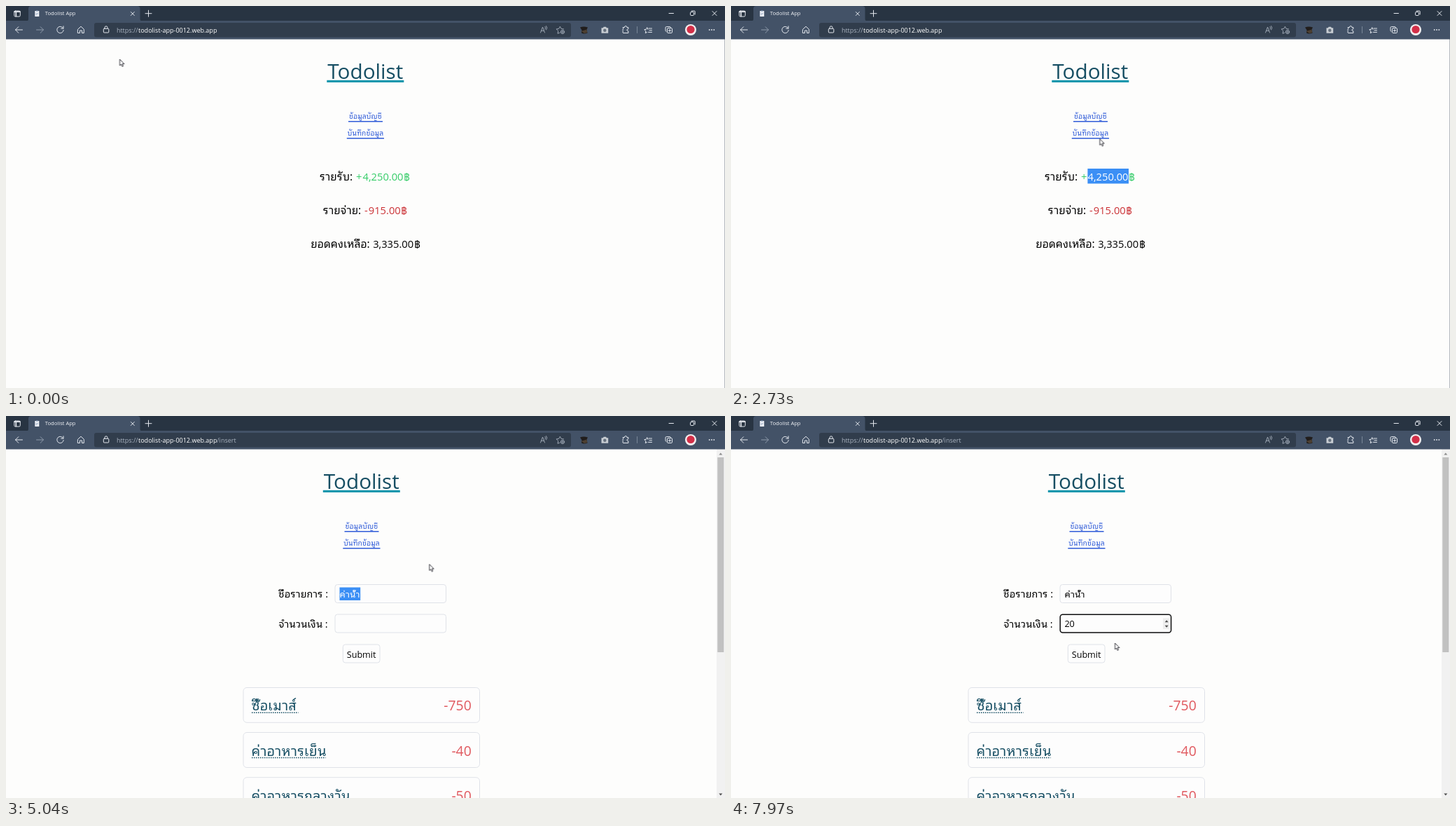
Animation of 1027 by 545 pixels, one loop 8000 ms. Source, as an HTML page:

```html
<!DOCTYPE html>
<html lang="th">
<head>
<meta charset="utf-8">
<title>Todolist App</title>
<style>
html, body { margin: 0; width: 100%; height: 100%; overflow: hidden; background: #fdfdfc; }
svg { display: block; width: 100vw; height: 100vh; }
text { font-family: "Open Sans", "Noto Sans Thai Looped", "Noto Looped Thai", "Noto Sans Thai", Loma, "Noto Sans", sans-serif; white-space: pre; }
.mid { text-anchor: middle; }
.end { text-anchor: end; }
.title { font-size: 29.7px; fill: #164e63; text-anchor: middle; }
.link { font-size: 10.4px; fill: #2f5bd8; text-anchor: middle; }
.sum { font-size: 15.6px; text-anchor: middle; }
.num { font-size: 14.7px; }
.label { font-size: 14.6px; text-anchor: middle; }
.value { font-size: 13px; }
.item { font-size: 19.8px; fill: #164e63; }
.cost { font-size: 19.4px; fill: #e0595f; text-anchor: end; }
.box { fill: #fdfdfd; stroke: #dfe2e8; }
.icon { fill: none; stroke: #e4e8ee; stroke-width: 1; stroke-linecap: round; stroke-linejoin: round; }
.dim { stroke: #8f9bab; }

/* hard switches */
.sw { animation: 8s step-end infinite; }
.home { animation-name: home; }
.insert { animation-name: insert; }
.pickSum { animation-name: pickSum; }
.typed { animation-name: typed; }
.pickName { animation-name: pickName; }
.spin { animation-name: spin; }
.focus { animation-name: focus; }
.two { animation-name: two; }
.zero { animation-name: zero; }
.arrow { animation-name: arrow; }
.beam { animation-name: beam; }
.hand { animation-name: hand; }
@keyframes home { 0% { opacity: 1 } 37.1% { opacity: 0 } }
@keyframes insert { 0% { opacity: 0 } 37.1% { opacity: 1 } }
@keyframes pickSum { 0% { opacity: 0 } 21.9% { opacity: 1 } 37.1% { opacity: 0 } }
@keyframes typed {
  0% { clip-path: inset(-5px 100% -5px 0) }
  47.6% { clip-path: inset(-5px 73% -5px 0) }
  48.6% { clip-path: inset(-5px 51% -5px 0) }
  49.6% { clip-path: inset(-5px 22% -5px 0) }
  50.7% { clip-path: inset(-5px) }
}
@keyframes pickName { 0% { opacity: 0 } 58% { opacity: 1 } 65.2% { opacity: 0 } }
@keyframes spin { 0% { opacity: 0 } 70.4% { opacity: 1 } }
@keyframes focus { 0% { opacity: 0 } 75% { opacity: 1 } }
@keyframes two { 0% { opacity: 0 } 81.25% { opacity: 1 } }
@keyframes zero { 0% { opacity: 0 } 84.6% { opacity: 1 } }
@keyframes arrow {
  0% { opacity: 1 } 19.4% { opacity: 0 } 25.6% { opacity: 1 } 34.9% { opacity: 0 }
  40.8% { opacity: 1 } 42.5% { opacity: 0 } 60.4% { opacity: 1 } 70.3% { opacity: 0 } 96% { opacity: 1 }
}
@keyframes beam {
  0% { opacity: 0 } 19.4% { opacity: 1 } 25.6% { opacity: 0 } 42.5% { opacity: 1 }
  60.4% { opacity: 0 } 70.3% { opacity: 1 } 96% { opacity: 0 }
}
@keyframes hand { 0% { opacity: 0 } 34.9% { opacity: 1 } 40.8% { opacity: 0 } }

.pointer { animation: move 8s ease-in-out infinite; }
@keyframes move {
  0%, .375% { transform: translate(162.5px, 76px) }
  5.4%, 7.9% { transform: translate(690px, 182px) }
  8.25%, 10.4% { transform: translate(689px, 184px) }
  12.5%, 14.1% { transform: translate(684px, 195.5px) }
  20.4%, 23.5% { transform: translate(545px, 244px) }
  30.4%, 32.9% { transform: translate(534px, 196px) }
  34.1%, 34.6% { transform: translate(526.7px, 189.5px) }
  35.4%, 39.6% { transform: translate(524px, 182px) }
  44.1%, 53.75% { transform: translate(530.7px, 253px) }
  56%, 58.2% { transform: translate(495px, 254px) }
  63%, 64.6% { transform: translate(604.7px, 211.5px) }
  71.75%, 86.75% { transform: translate(576.7px, 300.5px) }
  89.6%, 93.75% { transform: translate(572px, 303px) }
  99.6%, 100% { transform: translate(548.5px, 324px) }
}
</style>
</head>
<body>
<svg viewBox="0 0 1027 545" preserveAspectRatio="none">
  <defs>
    <g id="head">
      <text class="title" x="513.2" y="103.6">Todolist</text>
      <rect x="458.3" y="105.8" width="110" height="3.2" fill="#1797ad"/>
      <text class="link" x="513.3" y="161">ข้อมูลบัญชี</text>
      <rect x="489" y="164" width="49" height="1.5" fill="#2f5bd8"/>
      <text class="link" x="513.3" y="185.3">บันทึกข้อมูล</text>
      <rect x="486.8" y="188" width="53.2" height="1.5" fill="#2f5bd8"/>
    </g>
  </defs>
  <rect width="1027" height="545" fill="#fdfdfc"/>

  <!-- summary page -->
  <g class="sw home">
    <use href="#head"/>
    <text class="sum" x="471.5" y="249">รายรับ:</text>
    <g class="num" fill="#35cc68">
      <text x="500" y="249">+</text><text x="509.6" y="249">4,250.00</text><text x="568.2" y="249">฿</text>
    </g>
    <text class="sum" x="480" y="297">รายจ่าย:</text>
    <g class="num" fill="#cb3236">
      <text x="512" y="297">-</text><text x="517.8" y="297">915.00</text><text x="564.3" y="297">฿</text>
    </g>
    <text class="sum" x="477.5" y="345">ยอดคงเหลือ:</text>
    <g class="num"><text x="524.2" y="345">3,335.00</text><text x="583.2" y="345">฿</text></g>
    <g class="sw pickSum">
      <rect x="509.4" y="232" width="58.6" height="21.4" fill="#3b8ff5"/>
      <text class="num" x="509.6" y="249" fill="#fff">4,250.00</text>
    </g>
    <rect x="1026" y="47" width="1" height="498" fill="#b4b8be"/>
  </g>

  <!-- entry page -->
  <g class="sw insert">
    <use href="#head" x="-5.5"/>
    <text class="label" x="424.5" y="259">ชื่อรายการ :</text>
    <text class="label" x="424.5" y="301.5">จำนวนเงิน :</text>
    <rect class="box" x="470" y="240.5" width="158.5" height="26" rx="3.5"/>
    <rect class="box" x="470" y="283" width="158.5" height="26" rx="3.5"/>
    <g class="sw typed"><text class="value" x="476.5" y="258.8">ค่าน้ำ</text></g>
    <g class="sw pickName">
      <rect x="476.5" y="244.5" width="29.7" height="18.5" fill="#3b8ff5"/>
      <text class="value" x="476.5" y="258.8" fill="#fff">ค่าน้ำ</text>
    </g>
    <g class="sw spin">
      <rect x="617" y="288.5" width="10.5" height="15.5" fill="#eeeeee"/>
      <path d="M619.7 294.2l2.5-3 2.5 3zM619.7 298.7l2.5 3 2.5-3z" fill="#4c4c4c"/>
    </g>
    <rect class="sw focus" x="470.2" y="283.2" width="158.4" height="25.8" rx="3.5" fill="none" stroke="#101010" stroke-width="1.5"/>
    <text class="value sw two" x="476.4" y="301.4" style="font-size:12.6px">2</text>
    <text class="value sw zero" x="483.6" y="301.4" style="font-size:12.6px">0</text>
    <rect class="box" x="481.3" y="326" width="52.7" height="26" rx="3.5"/>
    <text class="mid" x="507.6" y="344.7" font-size="12.6">Submit</text>

    <rect class="box" x="339" y="387.5" width="337.5" height="49.8" rx="5"/>
    <rect class="box" x="339" y="451.5" width="337.5" height="50" rx="5"/>
    <rect class="box" x="339" y="515.7" width="337.5" height="50" rx="5"/>
    <text class="item" x="350.5" y="420.2">ซื้อเมาส์</text>
    <text class="item" x="350.5" y="484.6">ค่าอาหารเย็น</text>
    <text class="item" x="350.5" y="548.8">ค่าอาหารกลางวัน</text>
    <path d="M351 423.3H417.5M351 487.6H456.5" stroke="#164e63" stroke-width="1.5" stroke-dasharray="1.5 1.5"/>
    <text class="cost" x="664.8" y="420.2">-750</text>
    <text class="cost" x="664.8" y="484.6">-40</text>
    <text class="cost" x="664.8" y="548.8">-50</text>

    <rect x="1015" y="47" width="12" height="498" fill="#f1f1f1"/>
    <rect x="1016.3" y="59" width="9" height="278" fill="#c1c1c1"/>
    <path d="M1018.3 55.5l2.5-3 2.5 3z" fill="#8a8a8a"/>
    <path d="M1018.3 538.5l2.5 3 2.5-3z" fill="#505050"/>
  </g>

  <!-- browser frame -->
  <rect width="1027" height="22" fill="#283442"/>
  <rect y="21" width="1027" height="26.5" fill="#435267"/>
  <path d="M29 21.5q3 0 3-3V4q0-4 4-4H187.500q4 0 4 4V18.500q0 3 3 3z" fill="#435267"/>
  <rect x="126" y="24" width="681" height="20.500" rx="3" fill="#313d4c"/>
  <text x="55.8" y="13.300" font-size="7.600" fill="#f2f4f7">Todolist App</text>
  <text class="end" x="188.600" y="37.500" font-size="9" fill="#a9b3c0">https://</text>
  <text x="189" y="37.500" font-size="9" fill="#fff">todolist-app-0012.web.app<tspan class="sw insert" fill="#a9b3c0" id="path"></tspan></text>
  <g class="sw insert"><text x="301.300" y="37.500" font-size="9" fill="#a9b3c0">/insert</text></g>

  <g class="icon">
    <rect x="11.800" y="7" width="8.500" height="8" rx="1.500"/><path d="M12 8.200H20M14.300 9V14.500" stroke-width="1.700"/>
    <path d="M178.300 8.500l5 5m0-5l-5 5M203.500 6.200v9m-4.500-4.500h9"/>
    <path d="M947 10.500h6.500M1009 7.500l6 6m0-6l-6 6"/>
    <rect x="977.500" y="8.500" width="5" height="5" rx="1"/><path d="M979.200 7h4q1 0 1 1v4"/>
    <path d="M23.500 34h-10m4.300-4.300L13.500 34l4.300 4.300"/>
    <path class="dim" d="M43.500 34h10m-4.300-4.300l4.300 4.300-4.300 4.300"/>
    <path d="M81.800 32a4.700 4.700 0 1 0 .400 2.500M82 28.800v3.300h-3.300"/>
    <path d="M102.700 33.200l4.300-4 4.300 4v5.300h-2.800v-3.500h-3v3.500h-2.800z"/>
    <rect x="139.300" y="32.300" width="7.500" height="5.700" rx="1"/><path d="M141 32v-1.200a2 2 0 0 1 4 0V32"/>
    <g stroke="#a7b1be" stroke-width=".9">
      <path d="M763.500 38l3-8 3 8m-5-2.700h4M770 29.500q1.500 1.500 0 3.500m1.700-4.500q2.300 2.500 0 5.500"/>
      <path d="M791 38l-3 1.300.700-3.800-2.600-2.600 3.600-.500 1.700-3.200 1.700 3.200 3.400.500"/>
      <circle cx="795" cy="37" r="2.600"/><path d="M795 35.700v2.600m-1.300-1.300h2.600"/>
    </g>
    <path d="M881.500 30.500h2q0-2 1.700-2t1.700 2h2v2.300q-2 0-2 1.500t2 1.500v2.700h-7.400q-1.500-1.500 0-3-2-1.200 0-2.500z"/>
    <path d="M901.500 29.500v9" stroke="#7a8798"/>
    <path d="M915.500 37.500l-2.200 1.200.500-3-2-2 2.700-.400 1.200-2.700 1.200 2.700M918 32h4.500m-3.500 2.700h3.500m-5 2.700h5"/>
    <rect x="944.500" y="31.500" width="7" height="7" rx="1.300"/><path d="M943 36.500q-1-.500-1-1.500v-4q0-1.500 1.500-1.500h4.500q1 0 1.500 1M948 33.300v3.400m-1.700-1.700h3.400"/>
  </g>
  <path d="M41.300 7h6v8h-6z" fill="#f0f3f8"/><path d="M43 6.300h2.600v1.500H43zM42.500 10h3.500v.800h-3.500zM42.500 12h2.500v.800h-2.500z" fill="#8499b5"/>
  <path d="M820 30.500q5-2 11 0l-1.500 3 1 5q-5 2-8.500 0l.500-4z" fill="#211d1b"/><path d="M821.500 36l8-2.500.700 4.500-4 1z" fill="#4d4032"/>
  <path d="M850.500 31.200h2.200l1-1.500h3.300l1 1.500h2.200v7.500h-9.700z" fill="#c8cdd3"/><circle cx="855.300" cy="34.800" r="2.200" fill="#66717f"/>
  <circle cx="978" cy="34" r="8" fill="#f3eff0"/><circle cx="978" cy="33.500" r="5.600" fill="#d32f48"/>
  <g fill="#e4e8ee"><circle cx="1004.700" cy="34" r=".9"/><circle cx="1008" cy="34" r=".9"/><circle cx="1011.300" cy="34" r=".9"/></g>

  <!-- mouse pointer -->
  <g class="pointer">
    <path class="sw arrow" d="M0 0V9l2-1.800 1.500 3.200 1.500-.700L3.600 6.600h2.800z" fill="#fff" stroke="#26262e" stroke-width=".9"/>
    <path class="sw beam" d="M-2-4.200H-.500L0-3.700.500-4.200H2M0-3.700V3.700M-2 4.200H-.500L0 3.700.500 4.200H2" fill="none" stroke="#333" stroke-width=".9"/>
    <path class="sw hand" d="M-.900 5V.700q.900-1.200 1.800 0V4l4 .900q1 .300.900 1.300L5 11H.500L-2.700 7q-.200-1.300 1.800-.500z" fill="#fff" stroke="#26262e" stroke-width=".8" stroke-linejoin="round"/>
  </g>
</svg>
</body>
</html>
```
